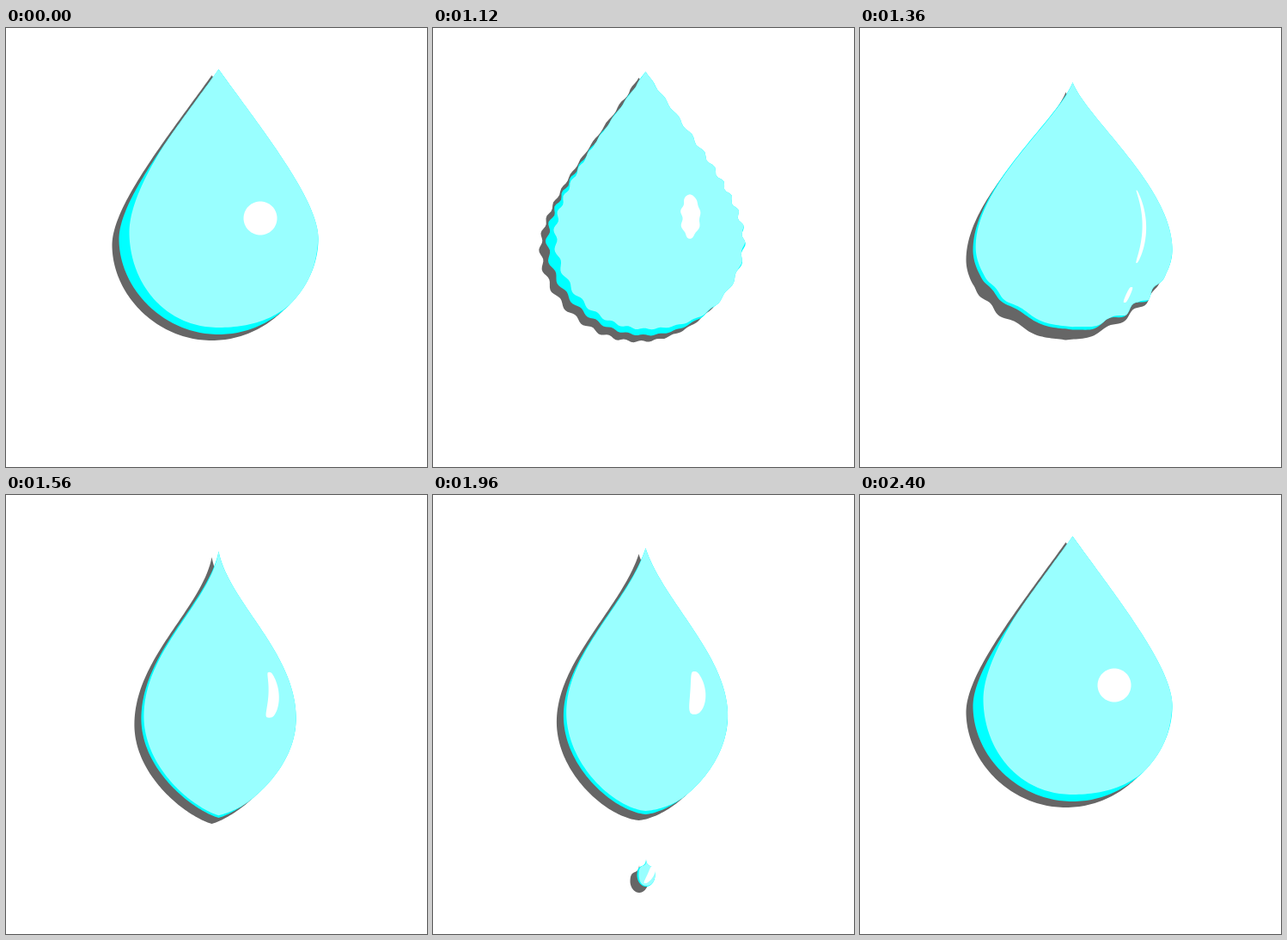
These frames come from a looping animation (490x510 px, 4000 ms). An HTML page with a canvas:

```html
<!DOCTYPE html>
<html lang="en">
<head>
<meta charset="utf-8">
<title>Water drop</title>
<style>
  html, body { margin: 0; width: 100%; height: 100%; overflow: hidden; background: #fff; }
  canvas { display: block; width: 490px; height: 510px; }
</style>
</head>
<body>
<canvas id="stage" width="490" height="510"></canvas>
<script>
const ctx = document.getElementById('stage').getContext('2d');
const LOOP = 4000, STEP = 40, TAU = Math.PI * 2;
const GRAY = '#666', CYAN = '#0ff', LIGHT = '#9ff', WHITE = '#fff';
const RIPPLE = 880, SQUASH = 1200, FORM = 1560, RELEASE = 1800;
const SPRING = 2000, LAND = 2080, DRY = 2160, REST = 2400;

const clamp = (v, lo = 0, hi = 1) => Math.min(hi, Math.max(lo, v));
const progress = (t, from, to) => clamp((t - from) / (to - from));

// How far the drop is drawn out from round (0) to pointed at both ends (1).
function pinchAt(t) {
  if (t < RIPPLE || t >= REST) return 0;
  if (t >= SPRING) {
    const p = progress(t, SPRING, REST);
    return 0.6 * Math.exp(-1.5 * p) * Math.cos(1.55 * Math.PI * p);
  }
  return 0.12 + 0.63 * progress(t, SQUASH, 1360)
    + 0.25 * progress(t, 1360, RELEASE) - 0.4 * progress(t, RELEASE, SPRING);
}

// Sideways bulge in pixels.
function squashAt(t) {
  if (t < RIPPLE || t >= SPRING) return 0;
  const swing = clamp((t - SQUASH) / 80, 0, Math.PI);
  return 2 * (1 - progress(t, SQUASH, 1440)) + 24 * Math.sin(swing);
}

function bodyShape(pinch, squash) {
  const round = Math.min(1, 1 - pinch);
  return {
    x: 247.5,
    top: Math.max(48, 48 + 20 * pinch),
    tipX: 52 - 47 * pinch,
    tipY: 72 - 15 * pinch - 0.8 * squash,
    shoulder: 45 + 37 * pinch,
    half: 116 - 30 * pinch + squash,
    waist: 245 + 17 * pinch,
    bottom: 356 + 22 * pinch - 0.9 * squash,
    baseX: 64 - 39 * pinch + 0.5 * squash,
    baseY: -16 * pinch ** 4,
    insetX: 3 + 9 * round ** 3,
    insetY: 2 + 6 * round,
  };
}

function dripShape(t) {
  if (t >= LAND) {
    const flat = progress(t, LAND, DRY);
    const half = 25.5 + 4 * flat, height = 15 - 10 * flat, bottom = 505 + flat;
    return {
      x: 251.5, top: bottom - height, bottom, half,
      tipX: 0.8 * half, tipY: 0, shoulder: height * 0.4, waist: bottom - height / 2,
      baseX: 0.8 * half, baseY: 0, insetX: 1, insetY: 4 - 3 * flat,
    };
  }
  const grown = progress(t, FORM, RELEASE), fall = Math.max(0, (t - RELEASE) / 160);
  const bottom = 378 + 56 * grown + 21 * fall * fall;
  const height = bottom - 370 - (21 * fall * fall + 32 * Math.min(1, fall));
  const length = fall > 0 ? 64 - 32 * Math.min(1, fall) : height;
  const half = 10.5 * grown;
  return {
    x: 248, top: bottom - length, bottom, half,
    tipX: 1, tipY: 0.4 * length, shoulder: 1.5 * half, waist: bottom - 1.25 * half,
    baseX: 0.55 * half, baseY: 0, insetX: 2 * grown, insetY: grown,
  };
}

function bezier(points, p0, p1, p2, p3) {
  for (let i = 0; i < 60; i++) {
    const t = i / 60, u = 1 - t;
    points.push([0, 1].map(n =>
      u * u * u * p0[n] + 3 * u * u * t * p1[n] + 3 * u * t * t * p2[n] + t * t * t * p3[n]));
  }
}

function dropOutline(shape, inner = 0) {
  const { x, top, tipX, tipY, shoulder, half, baseX, baseY } = shape;
  const insetX = inner * shape.insetX, insetY = inner * shape.insetY;
  const waist = shape.waist - insetY, bottom = shape.bottom - insetY;
  const left = x - half + insetX, right = x + half;
  const pull = insetX * (1.1 - tipX / 33);
  const swell = 1 + 0.18 * inner;
  const belly = 0.52 * (bottom - waist);
  const tip = [x, top], east = [right, waist], south = [x, bottom], west = [left, waist];
  const points = [];
  bezier(points, tip, [x + tipX, top + tipY], [right, waist - shoulder], east);
  bezier(points, east, [right, waist + belly * swell], [x + baseX * swell, bottom + baseY], south);
  bezier(points, south, [x - baseX, bottom + baseY], [left, waist + belly], west);
  bezier(points, west, [left, waist - shoulder], [x - tipX + pull, top + tipY], tip);
  return points;
}

// An ellipse that can bend, lean, taper and grow blunt ends.
function glintOutline({ x, y, half, tall, bow = 0, lean = 0, round = 1, taper = 0 }) {
  return Array.from({ length: 80 }, (_, i) => {
    const angle = i / 80 * TAU, s = Math.sin(angle), along = -Math.cos(angle);
    const width = half * Math.abs(s) ** round * (1 + taper * along);
    return [x + lean * along + bow * s * s + Math.sign(s) * width, y + tall * along];
  });
}

function bodyGlint(pinch, squash, ripple) {
  const worn = ripple && pinch < 0.2;
  return glintOutline({
    x: 296 + 12 * pinch + 0.75 * squash,
    y: 221 + 13 * pinch - (worn ? 4 : 0),
    half: (4 + 15.5 * (1 - pinch) - 0.25 * squash) * (worn ? 0.63 : 1),
    tall: (19.5 + 8 * pinch + 0.75 * squash) * (worn ? 1.15 : 1),
    bow: 6 * pinch + 0.2 * squash,
    round: 1 - 0.6 * pinch * pinch,
    taper: 0.3 * pinch,
  });
}

// Ripples grow longer and sink to the bottom as the drop is drawn out.
function rippleAt(t, pinch) {
  if (t < RIPPLE || t >= 1400) return null;
  return {
    amp: 1.8 + 3.6 * pinch,
    length: 18 + 34 * pinch,
    floor: 285 * progress(t, SQUASH, 1360),
    seed: t / 80,
  };
}

// Pushes an outline along its normals by an uneven wave.
function roughen(points, ripple, layer = 0) {
  if (!ripple) return points;
  const { amp, length, floor } = ripple, seed = ripple.seed + layer * 0.2;
  const count = points.length, travel = [0];
  for (let i = 1; i <= count; i++) {
    const a = points[i - 1], b = points[i % count];
    travel[i] = travel[i - 1] + Math.hypot(b[0] - a[0], b[1] - a[1]);
  }
  return points.map(([x, y], i) => {
    const a = points[(i + count - 1) % count], b = points[(i + 1) % count];
    const dx = b[0] - a[0], dy = b[1] - a[1], size = Math.hypot(dx, dy) || 1;
    const s = travel[i];
    const ends = clamp(Math.min(s, travel[count] - s) / 20);
    const mask = clamp((y - floor) / 30);
    const wave = Math.sin(TAU * s / length + seed * 2.4 + 2 * Math.sin(s / 37 + seed));
    const push = amp * wave * (0.65 + 0.35 * Math.sin(s / 61 + seed * 1.7)) * ends * mask;
    return [x + dy / size * push, y - dx / size * push];
  });
}

function toPath(points) {
  const path = new Path2D();
  points.forEach(([x, y]) => path.lineTo(x, y));
  path.closePath();
  return path;
}

function fill(path, color) {
  ctx.fillStyle = color;
  ctx.fill(path);
}

function drawShadow(shape, dx, dy, ripple) {
  ctx.save();
  ctx.translate(dx, dy);
  fill(toPath(roughen(dropOutline(shape), ripple, 2)), GRAY);
  ctx.restore();
}

function drawDrop(shape, ripple) {
  const outer = toPath(roughen(dropOutline(shape), ripple));
  fill(outer, CYAN);
  ctx.save();
  ctx.clip(outer);
  fill(toPath(roughen(dropOutline(shape, 1), ripple, 1)), LIGHT);
  ctx.restore();
}

function draw(t) {
  const pinch = pinchAt(t), squash = squashAt(t), ripple = rippleAt(t, pinch);
  const body = bodyShape(pinch, squash);
  const drip = t >= FORM + STEP && t < DRY ? dripShape(t) : null;
  const landed = t >= LAND;

  ctx.fillStyle = WHITE;
  ctx.fillRect(0, 0, 490, 510);
  drawShadow(body, -8, 7 + 0.2 * squash, ripple);
  if (drip) drawShadow(drip, landed ? -4 : -8, landed ? 3 : 7);

  drawDrop(body, ripple);
  const glintRipple = ripple && { ...ripple, length: ripple.length * 0.7, amp: pinch < 0.2 ? 2 : 0 };
  fill(toPath(roughen(bodyGlint(pinch, squash, ripple), glintRipple)), WHITE);
  if (pinch > 0.5 && squash > 10) {
    fill(toPath(glintOutline({ x: 312, y: 310, half: 2.5, tall: 9, lean: -4, round: 0.5 })), WHITE);
  }

  if (drip) {
    drawDrop(drip);
    if (!landed) {
      const size = drip.half / 10.5;
      fill(toPath(glintOutline({
        x: drip.x + 3.5 * size, y: drip.bottom - 14 * size, half: 4 * size, tall: 10 * size,
        lean: -4.5 * size, bow: 2 * size, round: 0.7,
      })), WHITE);
    }
  }
}

// The first ripples hold twice as long as the other poses.
function poseTime(t) {
  const hold = t >= RIPPLE && t < SQUASH ? 2 * STEP : STEP;
  return Math.floor(t / hold) * hold;
}

let shown = -1;
function tick() {
  const t = poseTime(performance.now() % LOOP);
  if (t !== shown) {
    draw(t);
    shown = t;
  }
  requestAnimationFrame(tick);
}
tick();
</script>
</body>
</html>
```
